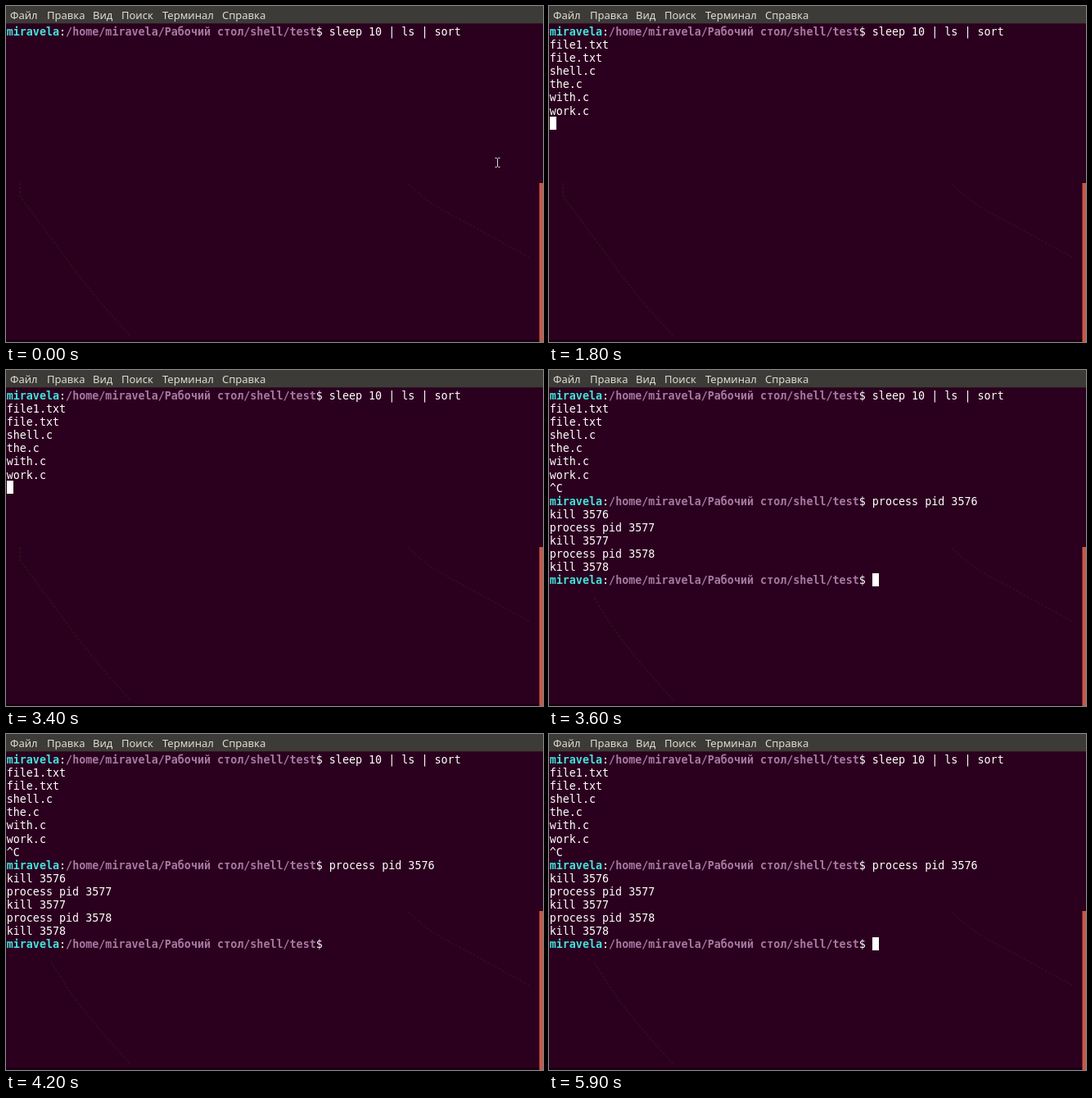
Write an HTML page that moves like this. It is 656 px wide and 410 px high and loops after 6 s.

```html
<!DOCTYPE html>
<html lang="ru">
<head>
<meta charset="utf-8">
<style>
  html, body { margin: 0; width: 100%; height: 100%; overflow: hidden; background: #2b001e; }
  svg { display: block; width: 656px; height: 410px; }
  text { white-space: pre; fill: #fff; font: 13.36px "DejaVu Sans Mono", monospace; }
  .menu text { fill: #dfdbd2; font: 13px "Noto Sans", sans-serif; }
  .user { fill: #43e3dc; font-weight: bold; }
  .path { fill: #a678a2; font-weight: bold; }
  .trace { fill: none; stroke: #3a2a10; stroke-width: 1; stroke-dasharray: 3 2; opacity: .7; }
</style>
</head>
<body>
<svg viewBox="0 0 656 410">
  <rect width="656" height="410" fill="#2b001e"/>
  <path id="leftTrace" class="trace"/>
  <path class="trace" d="M492 217Q515 241 550 258L640 307" style="stroke:#43183a"/>
  <rect y="407" width="656" height="3" fill="#1b0013"/>
  <rect x="651.5" y="216" width="4.5" height="194" fill="#c45a48"/>
  <rect width="656" height="21.3" fill="#3c3b37"/>
  <g class="menu">
    <text x="5" y="16">Файл</text>
    <text x="50" y="16">Правка</text>
    <text x="106" y="16">Вид</text>
    <text x="141" y="16">Поиск</text>
    <text x="191" y="16">Терминал</text>
    <text x="264" y="16">Справка</text>
  </g>
  <g id="screen"></g>
  <rect id="cursor" width="8" height="16" fill="#fff"/>
  <path id="pointer" d="M597.5 185.5h2l1 1 1-1h2M600.5 186v10M597.5 196.5h2l1-1 1 1h2" fill="none" stroke="#ddd"/>
</svg>
<script>
const LOOP = 6000, ENTER = 1700, INTERRUPT = 3500, BLINK = 600;
const COLUMN = 8.04, ROW = 16.09;
const get = id => document.getElementById(id);
const prompt = '<tspan class="user">miravela</tspan>:' +
  '<tspan class="path">/home/miravela/Рабочий стол/shell/test</tspan>$ ';

const command = [prompt + 'sleep 10 | ls | sort'];
const listing = ['file1.txt', 'file.txt', 'shell.c', 'the.c', 'with.c', 'work.c'];
const killed = ['^C', prompt + 'process pid 3576', 'kill 3576',
  'process pid 3577', 'kill 3577', 'process pid 3578', 'kill 3578', prompt];

const longTrace = 'M17 216V232L75 310Q100 346 153 404';
const shortTrace = 'M55 278L75 310Q100 346 153 404';

// The blink restarts, visible, at each key press.
const stages = [
  { start: 0, blinkFrom: 600, lines: command, row: 0, column: 69 },
  { start: ENTER, blinkFrom: ENTER, lines: [...command, ...listing], row: 7, column: 0 },
  { start: INTERRUPT, blinkFrom: INTERRUPT, lines: [...command, ...listing, ...killed], row: 14, column: 49 }
];
let shown;

function show(stage) {
  shown = stage;
  get('screen').innerHTML = stage.lines.map((line, i) =>
    `<text x="0.7" y="${Math.round(36 + i * ROW)}">${line}</text>`).join('');
  get('cursor').setAttribute('x', Math.round(1 + stage.column * COLUMN));
  get('cursor').setAttribute('y', Math.round(22.8 + stage.row * ROW));
  get('pointer').style.display = stage.start < ENTER ? '' : 'none';
  get('leftTrace').setAttribute('d', stage.start < INTERRUPT ? longTrace : shortTrace);
}

function draw() {
  const time = performance.now() % LOOP;
  const stage = stages.findLast(s => time >= s.start);
  if (stage !== shown) show(stage);
  const lit = Math.floor((time - stage.blinkFrom) / BLINK) % 2 === 0;
  get('cursor').style.display = lit ? '' : 'none';
  requestAnimationFrame(draw);
}
draw();
</script>
</body>
</html>
```
